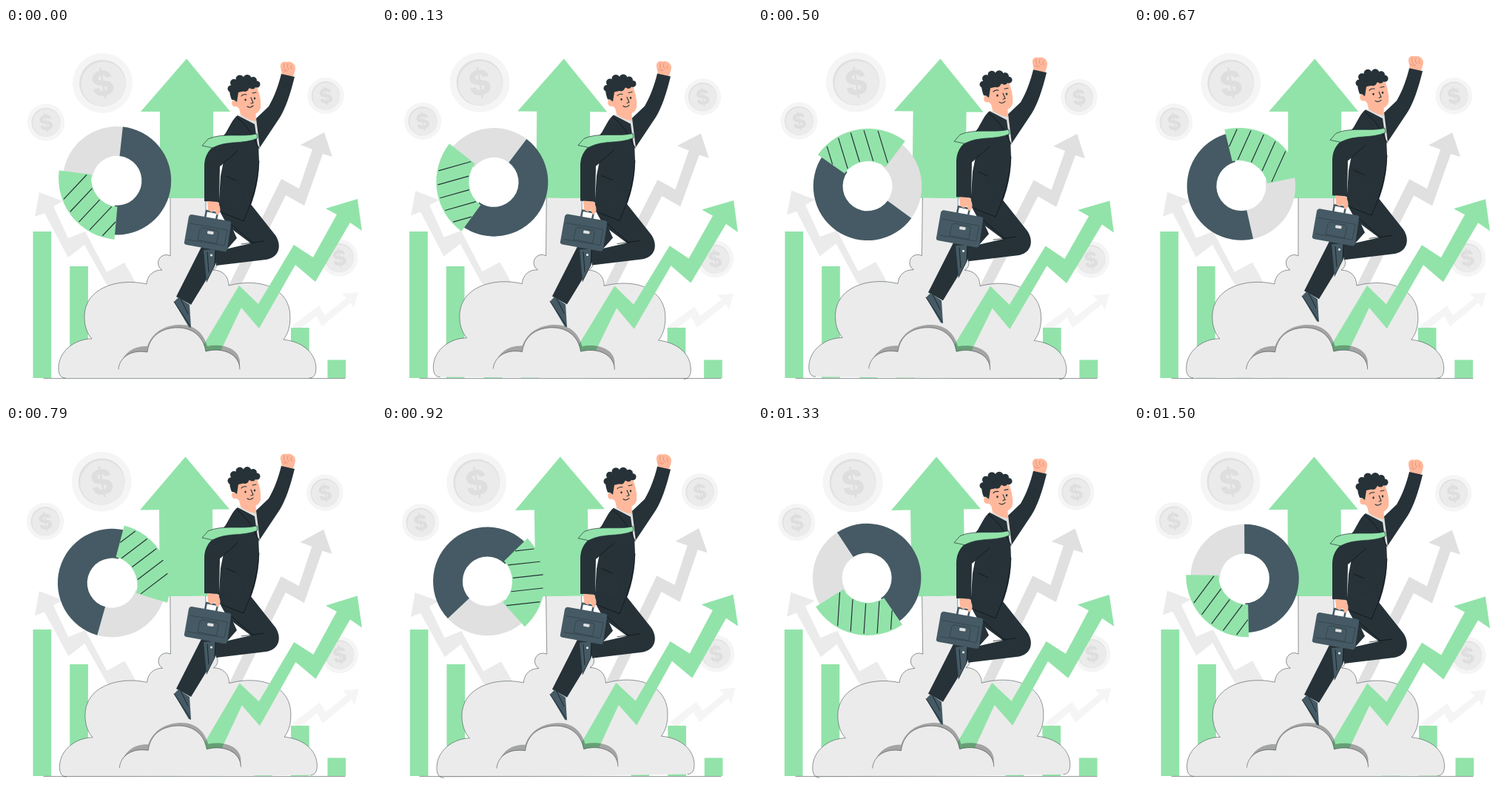
Animation, 500 px wide and 500 px high, one loop 1.54 s. Source, as an HTML page:

```html
<!DOCTYPE html>
<html lang="en">
<head>
<meta charset="utf-8">
<title>Business growth</title>
<style>
html, body { margin: 0; width: 100%; height: 100%; overflow: hidden; background: #fff; }
svg { display: block; width: 100vw; height: 100vh; }
.green { fill: #92e3a9; }
.suit { fill: #263238; }
.slate { fill: #455a64; }
.skin { fill: #ffb89b; }
.cloud { fill: #ebebeb; }
.line, .seam { fill: none; stroke: #263238; stroke-width: .5; stroke-linecap: round; stroke-linejoin: round; }
.seam { stroke: #0b1115; stroke-width: .7; }
text { font: 800 46px Inter, sans-serif; text-anchor: middle; fill: #dedede; }
</style>
</head>
<body>
<svg viewBox="0 0 500 500">
  <defs>
    <g id="coin">
      <circle r="40.5" fill="#f5f5f5"/>
      <circle r="31.5" fill="#e0e0e0"/>
      <circle cx="1" cy="1.2" r="30" fill="#ebebeb"/>
      <text transform="rotate(-10)" y="17">$</text>
    </g>
  </defs>

  <g class="sway">
    <use href="#coin" x="130.500" y="74.500"/>
    <use href="#coin" transform="translate(54 127.500) scale(.62)"/>
    <use href="#coin" transform="translate(432 91.500) scale(.61)"/>
    <use href="#coin" transform="translate(450.500 310.500) scale(.62)"/>
    <path fill="#e0e0e0" d="M430 141L441 174 428 170 403 240 378 226 316 350H300L372 204 396 217 414 164 398 158Z"/>
    <path fill="#ebebeb" d="M45 222L77 234 64 241 84 284 107 275 136 330 160 317 184 360H150L135 345 106 293 84 310 52 250 39 255Z"/>
    <path fill="#f5f5f5" d="M476 357L470 379 466 371 427 403 419 389 394 410 387 402 423 375 431 388 460 365 454 359Z"/>
    <path class="green" d="M244 41.500L303 113H280V230H208V113H182Z"/>
  </g>

  <g id="bars" class="green"></g>
  <g id="donut"></g>

  <g class="sway">
    <g id="smoke"></g>
    <path class="green" d="M475 231L481 274 465 263 418 343 391 320 342 406 318 378 286 445 260 440 315 348 341 373 389 293 415 310 447 252 432 244Z"/>
    <path opacity=".3" d="M154 455C160 438 173 429 191 430C199 408 219 401 236 401C256 401 268 414 272 430C291 426 314 432 316 450V460H154Z"/>
    <path class="cloud" d="M152 462C153 446 168 434 191 438C194 414 213 405 232 405C252 405 267 417 270 437C292 431 316 440 316 462L308 468H160Z"/>
    <path class="line" d="M152 461C153 446 168 434 191 438C194 414 213 405 232 405C252 405 267 417 270 437C292 431 316 440 316 461"/>
  </g>
  <path class="line" d="M51 473.500H458"/>

  <g id="man">
    <!-- legs and shoes -->
    <path class="suit" d="M266 292L230 363 250 374 272 338 287 312 312 284 300 258Z"/>
    <path class="suit" d="M290 250L326 232 364 280C374 295 368 311 351 313L284 321 283 302 331 291 300 268Z"/>
    <path class="seam" d="M303 264L334 291M318 292L349 288"/>
    <path class="slate" d="M227 370L233 364 248 374 250 405 247 404Z"/>
    <path class="seam" d="M227 370L249 403M236 366L246 386"/>
    <path class="slate" d="M267 300L283 299 282 321 271 343Z"/>
    <path class="seam" d="M283 299L282 321 271 343M272 303L274 330"/>
    <circle cx="277.500" cy="307" r="1.500" fill="#fff"/>
    <!-- raised arm -->
    <path class="skin" d="M373 63L371 53C370 47 375 44 379 46C383 44 390 47 391 53C391 59 389 61 388 66Z"/>
    <path d="M376 48Q374 53 378 57M381 48Q379 54 383 56M386 50Q384 55 387 56M373 56Q378 60 381 57" fill="none" stroke="#e58a71" stroke-width=".8"/>
    <path class="suit" d="M372 62L390 66C384 90 378 108 370 121L342 163 334 126 355 106C363 92 368 78 372 62Z"/>
    <!-- torso -->
    <path class="suit" d="M313 118C306 123 302 134 295 145L286 160 294 180 290 200 287 248 321 261C333 239 342 211 342 180L340 130Z"/>
    <path d="M313 118L320 117 338 122 343 163 340 158 336 130Z" fill="#e0e0e0"/>
    <path class="skin" d="M314 104L337 108 338 126Q325 124 317 117Z"/>
    <path class="suit" d="M299 140L280 160C270 169 268 178 268 188V234L288 236 289 187 312 166Z"/>
    <path class="seam" d="M311 120Q330 134 342 163M313 166L290 186M292 214L318 224 315 234 290 225ZM297 200L311 206M342 180Q341 216 321 261L288 248"/>
    <path d="M292 214L318 224 315 234 290 225Z" fill="none" stroke="#455a64" stroke-width=".5"/>
    <path class="green" stroke="#263238" stroke-width=".7" d="M339 143C319 148 292 141 273 150L265 159 279 162C300 151 319 158 340 149Z"/>
    <!-- head -->
    <path class="skin" d="M309 84L338 78C343 87 345 101 344 108C341 119 324 121 315 109L312 106C304 108 303 98 309 96Z"/>
    <g class="suit">
      <path d="M305 97C301 87 301 78 307 74Q320 63 337 70L341 79 331 80 323 85 314 87 312 100 308 97Z"/>
      <circle cx="304" cy="82" r="4.500"/><circle cx="308" cy="74" r="5"/>
      <circle cx="316" cy="69" r="5.500"/><circle cx="326" cy="68.500" r="5.500"/>
      <circle cx="334" cy="71" r="5"/><circle cx="339" cy="76" r="4.500"/>
      <circle cx="333" cy="78" r="4.500"/><circle cx="323" cy="81" r="5"/>
      <ellipse cx="323.500" cy="97" rx="1.200" ry="1.600"/><ellipse cx="336" cy="95" rx="1.200" ry="1.600"/>
    </g>
    <path d="M318 92Q320 89 325 90M333 88L338 87M331 94L334 101 331 102M326 106Q330 109 334 105" fill="none" stroke="#263238" stroke-width="1.100" stroke-linecap="round"/>
    <!-- briefcase and hand -->
    <path d="M269 256L271 247 286 250 284 259" fill="none" stroke="#455a64" stroke-width="2.500"/>
    <path d="M272 255L273 249 283 251 282 257Z" fill="#fff"/>
    <path class="skin" d="M272 234L286 235Q291 243 289 250L285 253 282 246 278 249 273 246Z"/>
    <path class="slate" d="M251 252L302 261Q305 262 304 265L299 299Q298 303 294 302L244 293Q240 292 241 289L247 255Q248 252 251 252Z"/>
    <path class="line" d="M249 264L299 273 295 294 246 286M259 286L262 272Q263 270 266 270L286 274Q288 275 287 278L285 291Z"/>
    <rect x="272" y="274.500" width="8.500" height="4" rx="1.500" fill="#e0e0e0" transform="rotate(8 276 277)"/>
  </g>
</svg>
<script>
const LOOP = 1540, TAU = Math.PI * 2;
const $ = id => document.getElementById(id);

// Growth bars: left edge and top
const bars = [[36.3, 275], [86, 322], [137, 440], [187, 455], [335, 440], [384.8, 405], [434.3, 448.5]];
$('bars').innerHTML = bars.map(([x, y]) =>
  `<rect x="${x}" y="${y}" width="24.700" height="${473 - y}"/>`).join('');

// Only the sides of the smoke are outlined
const leftSide = '80 473C74 473 71 468 71 460C71 436 94 420 116 420C109 412 106 402 106 390' +
  'C106 352 150 337 190 346C191 335 198 327 211 327A10.500 10.500 0 0 1 222 308V230';
const rightSide = '270 230V308A10.500 10.500 0 0 1 280 327C292 327 301 335 301 348' +
  'C347 336 384 354 384 390C384 402 382 412 375 421C402 424 419 440 419 460C419 468 416 473 410 473';
$('smoke').innerHTML =
  `<path class="cloud" d="M${leftSide}L${rightSide}Z"/><path class="line" d="M${leftSide}M${rightSide}"/>`;

function ringSlice(cx, cy, outer, inner, from, to, fill) {
  const at = (r, deg) => {
    const a = deg * TAU / 360;
    return `${cx + r * Math.cos(a)} ${cy + r * Math.sin(a)}`;
  };
  return `<path fill="${fill}" d="M${at(outer, from)}A${outer} ${outer} 0 0 1 ${at(outer, to)}` +
    `L${at(inner, to)}A${inner} ${inner} 0 0 0 ${at(inner, from)}Z"/>`;
}

// Parallel stripes, cut off at the sides of the green slice
const stripes = [-36, -18, 0, 18, 36].map(s => {
  const side = s > 0 ? .73 * s : -1.28 * s;
  const start = Math.max(Math.sqrt(39 * 39 - s * s), side) + 1;
  return `M${start} ${s}H${Math.sqrt(83 * 83 - s * s) - 2}`;
}).join('');
$('donut').innerHTML =
  ringSlice(149.9, 206.3, 73.3, 33.5, 186, 277, '#e0e0e0') +
  ringSlice(149.9, 206.3, 73.3, 33.5, -84, 95, '#455a64') +
  ringSlice(154, 203, 83, 39, 95, 187, '#92e3a9') +
  `<path transform="translate(154 203) rotate(133)" d="${stripes}" stroke="#263238" stroke-width="1.200"/>`;

// Linear interpolation through [time, value] pairs
function track(keys, t) {
  const i = keys.findIndex(k => k[0] > t);
  const [t0, v0] = keys[i - 1], [t1, v1] = keys[i];
  return v0 + (v1 - v0) * (t - t0) / (t1 - t0);
}
const spin = [[0, 0], [290, 69], [670, 161], [920, 220.5], [1080, 261.5], [1330, 320.5], [1500, 353.5], [LOOP, 360]];
const shake = [[0, .2], [290, 1.5], [670, -1], [920, 1.5], [1080, -1], [1330, -.5], [1500, .2], [LOOP, .2]];

const swaying = document.querySelectorAll('.sway');
const move = (el, value) => el.setAttribute('transform', value);

function draw(now) {
  const t = now % LOOP;
  const tilt = -.15 + .98 * Math.cos(TAU * (t - 345) / LOOP);
  const bob = -4 * (1 - Math.cos(TAU * t / LOOP));
  swaying.forEach(el => move(el, `rotate(${tilt} 246 257)`));
  move($('donut'), `rotate(${track(spin, t)} 146.8 209.5)`);
  move($('bars'), `translate(${track(shake, t)} 0)`);
  move($('man'), `translate(0 ${bob})`);
}

const begin = performance.now();
function tick() {
  draw(performance.now() - begin);
  requestAnimationFrame(tick);
}
tick();
</script>
</body>
</html>
```
